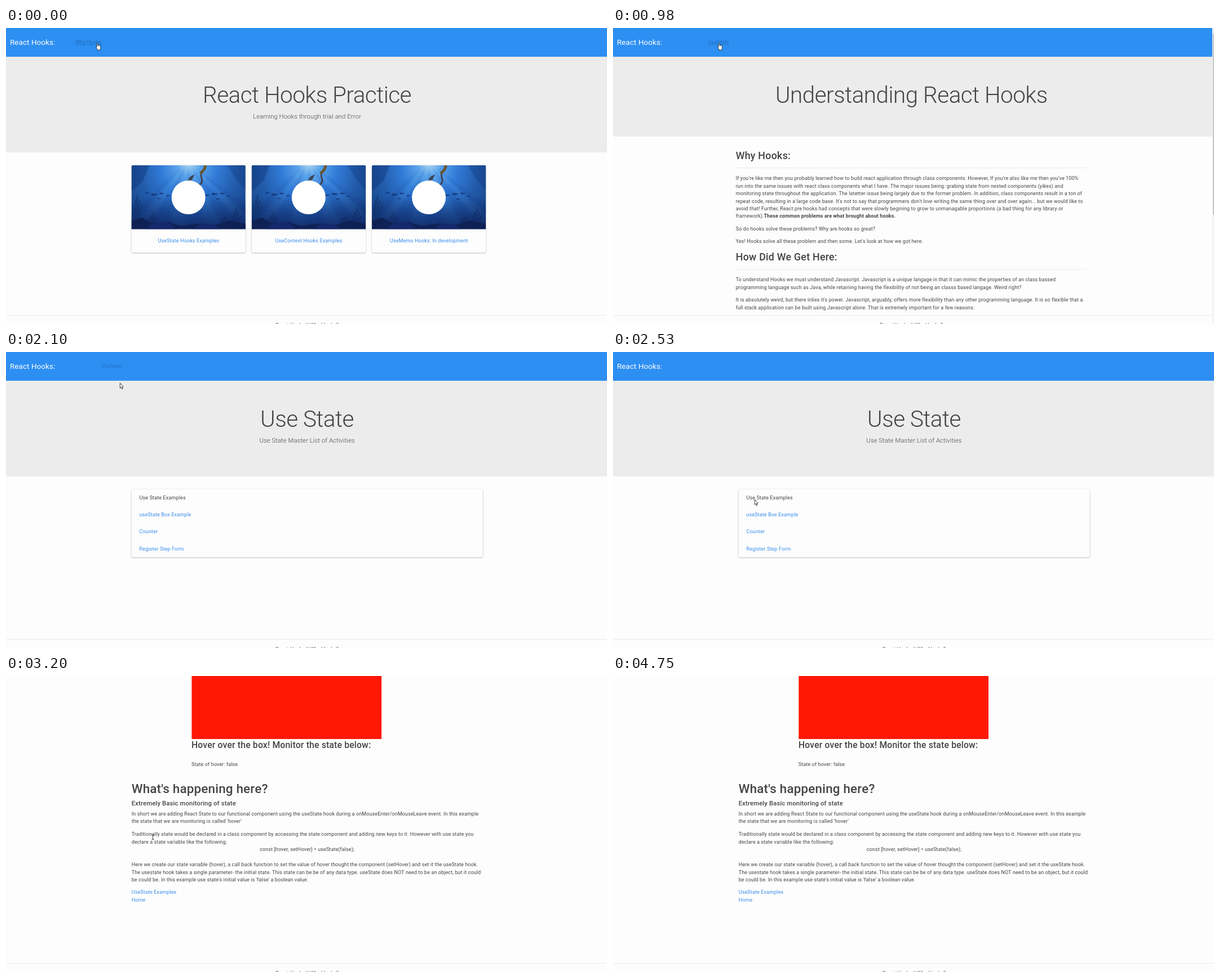
An HTML page with a canvas for the animation above (5560 ms loop, 1066 px wide and 526 px high).

```html
<!DOCTYPE html>
<html lang="en">
<head>
<meta charset="utf-8">
<title>React Hooks Practice</title>
<style>
  html, body { margin: 0; width: 100%; height: 100%; overflow: hidden; background: #fdfdfd; }
  canvas { display: block; }
</style>
</head>
<body>
<canvas id="stage" width="1066" height="526"></canvas>
<script>
const ctx = document.getElementById('stage').getContext('2d');
const W = 1066, H = 526, LOOP = 5560;
const REM = 8.98;
const INK = '#444', LINK = '#388cec', LINK_HOVER = '#1a66bd', BLUE = '#2d8ff2';

// Cursor and hover states: [start ms, cursor, x, y, hovered item, its colour]
const STEPS = [
  [0, 'hand', 159, 26, 'why', '#1f69bc'],
  [130, 'hand', 159, 26, 'why', '#2474c8'],
  [710, 'hand', 171, 26, 'state', '#2478cf'],
  [830, 'hand', 179, 26, 'state', '#206ebf'],
  [980, 'hand', 185, 26, 'state', '#206ebf'],
  [1380, 'hand', 185, 26, 'state', '#2272c6'],
  [2100, 'arrow', 202, 55, 'leaving', '#2272c6'],
  [2250, 'arrow', 217, 150],
  [2380, 'arrow', 228, 257],
  [2530, 'arrow', 251, 262],
  [2650, 'arrow', 258, 282],
  [2920, 'hand', 257, 285.5, 'box'],
  [3200, 'beam', 260.5, 286.5],
  [3480, 'beam', 270.5, 286.5],
  [3630, 'beam', 374, 221],
  [3780, 'arrow', 411, 169],
  [3930, 'arrow', 446, 98, 'red'],
  [4050, 'arrow', 466, 77, 'red'],
  [4360, 'arrow', 640, 260],
  [4490, 'arrow', 806, 442],
  [4630, 'arrow', 903, 508],
  [4750, 'none', 0, 0]
];

const PAGES = [[0, home], [130, article], [1230, stateList], [3200, boxExample]];

const at = (list, t) => list.findLast(item => item[0] <= t);

function rect(x, y, w, h, color) {
  ctx.fillStyle = color;
  ctx.fillRect(x, y, w, h);
}

// Draws a line of text around the vertical middle of its capitals; returns its width.
function text(str, x, mid, { size = REM, weight = 400, color = INK, align = 'left',
                             spacing = .12, style = '', underline = false } = {}) {
  ctx.font = `${style} ${weight} ${size}px Roboto, sans-serif`;
  ctx.letterSpacing = spacing + 'px';
  ctx.fillStyle = color;
  const width = ctx.measureText(str).width;
  const left = align === 'center' ? x - width / 2 : x;
  const base = mid + size * .355;
  ctx.fillText(str, left, base);
  if (underline) ctx.fillRect(left, base + .9, width, .7);
  return width;
}

const heading = (str, x, mid, rem) => text(str, x, mid, { size: REM * rem, weight: 500, spacing: .18 });
const link = (str, x, mid, opts) => text(str, x, mid, { color: LINK, spacing: .15, ...opts });

function paragraph(x, mid, ...lines) {
  lines.forEach((line, i) => {
    let left = x;
    for (const run of [line].flat()) {
      const [str, opts] = typeof run === 'string' ? [run] : [run.str, run];
      left += text(str, left, mid + i * 13.45, opts);
    }
  });
}

function chrome(center, pageWidth, step) {
  const [, , , , hover, color] = step;
  rect(0, 0, pageWidth, 51, BLUE);
  text('React Hooks:', 7, 25.3, { size: REM * 1.5, color: '#fff', spacing: .06 });
  if (hover === 'why') text('Why Hooks', 123, 25, { color, underline: true });
  if (hover === 'state' || hover === 'leaving')
    text('UseState', 169, 25, { color, underline: hover === 'state' });
  footer(center);
}

function footer(center) {
  rect(0, 510, W, 1, '#e9e9e9');
  text('React Hooks || Why Hooks?', center, 527.9, { align: 'center', color: '#666' });
}

function banner(center, width, bottom, title, lead) {
  ctx.fillStyle = '#ececec';
  ctx.beginPath();
  ctx.roundRect(0, 50, width, bottom - 50, [0, 0, 2, 2]);
  ctx.fill();
  rect(0, 51, width, 1, '#e0e3e7');
  text(title, center, 119, { size: REM * 4.5, weight: 300, align: 'center', spacing: -.5 });
  if (lead) text(lead, center, 156.8, { size: REM * 1.25, weight: 300, align: 'center' });
}

function card(x, y, w, h) {
  ctx.save();
  ctx.shadowColor = 'rgba(0,0,0,.32)';
  ctx.shadowBlur = 2.4;
  ctx.shadowOffsetY = .7;
  ctx.fillStyle = '#fdfdfd';
  ctx.beginPath();
  ctx.roundRect(x, y, w, h, 2);
  ctx.fill();
  ctx.restore();
}

function poly(color, points) {
  ctx.fillStyle = color;
  ctx.beginPath();
  points.forEach(p => ctx.lineTo(...p));
  ctx.fill();
}

function fish(x, y, size) {
  ctx.fillStyle = '#173f86';
  ctx.beginPath();
  ctx.ellipse(x, y, size, size * .5, 0, 0, 7);
  ctx.fill();
  poly('#173f86', [[x + size * .7, y], [x + size * 1.6, y - size * .5], [x + size * 1.6, y + size * .5]]);
}

function weed(x, base, height, color) {
  ctx.strokeStyle = color;
  ctx.lineWidth = 1.7;
  for (let i = -2; i <= 2; i++) {
    const top = base - height * (1 - Math.abs(i) * .2);
    ctx.beginPath();
    ctx.moveTo(x + i, base);
    ctx.bezierCurveTo(x + i * 5, base - 12, x + i * 1.5 - 4, top + 12, x + i * 4, top);
    ctx.stroke();
  }
}

function sea(x, y, w, h) {
  ctx.save();
  ctx.beginPath();
  ctx.roundRect(x, y, w, h, [2, 2, 0, 0]);
  ctx.clip();
  ctx.translate(x, y);
  const water = ctx.createRadialGradient(102, -6, 4, 102, 14, 128);
  [[0, '#a9d6f6'], [.14, '#5aa3ea'], [.38, '#317ad6'], [.68, '#215aa8'], [1, '#174286']]
    .forEach(stop => water.addColorStop(...stop));
  rect(0, 0, w, h, water);

  for (let i = 0; i < 9; i++) {
    const far = i * 34 - 35;
    poly(i % 2 ? 'rgba(120,190,250,.07)' : 'rgba(8,40,110,.07)', [[92 + i * 2, 0], [far, h], [far + 27, h]]);
  }
  poly('rgba(14,48,112,.4)', [[0, 0], [32, 0], [20, 28], [0, 46]]);
  poly('rgba(14,48,112,.3)', [[w, 0], [170, 0], [186, 26], [w, 44]]);

  const depth = ctx.createLinearGradient(0, 55, 0, h);
  depth.addColorStop(0, 'rgba(13,36,100,0)');
  depth.addColorStop(1, 'rgba(13,34,94,.8)');
  rect(0, 50, w, h - 50, depth);

  [[27, 49, 3], [39, 52, 4], [52, 50, 3], [64, 54, 2.6], [48, 59, 2.4], [133, 53, 3],
   [146, 51, 4], [160, 50, 3.2], [152, 60, 2.6], [171, 55, 2.4]].forEach(f => fish(...f));
  weed(11, 101, 48, '#12356f');
  weed(39, 106, 22, '#102a64');
  weed(187, 107, 30, '#122c68');
  weed(166, 108, 18, '#102a64');
  poly('#0f2154', [[0, 98], [19, 93], [37, 103], [63, 100], [88, 108], [121, 103],
                   [148, 106], [174, 98], [w, 104], [w, h], [0, h]]);
  poly('#15296a', [[37, 103], [63, 100], [80, h], [24, h]]);
  poly('#15296a', [[121, 103], [148, 106], [158, h], [110, h]]);

  ctx.lineCap = 'round';
  ctx.strokeStyle = '#3d4250';
  ctx.lineWidth = 2.8;
  ctx.stroke(new Path2D('M124 14 C121 21 128 25 124 31 C119 39 107 40 102 32 C100 26 104 21 109 19 L106 25'));
  ctx.strokeStyle = '#69552f';
  ctx.lineWidth = 5;
  ctx.stroke(new Path2D('M131 1 Q130 8 123.5 13'));

  ctx.fillStyle = '#fff';
  ctx.beginPath();
  ctx.arc(101, 57, 30, 0, 7);
  ctx.fill();
  ctx.restore();
}

function home(step) {
  banner(534, W, 221, 'React Hooks Practice', 'Learning Hooks through trial and Error');
  chrome(534, W, step);
  ['UseState Hooks Examples', 'UseContext Hooks Examples', 'UseMemo Hooks: In development']
    .forEach((label, i) => {
      const x = 222.6 + i * 213.2;
      card(x, 244, 202.2, 155.3);
      sea(x, 244, 202.2, 113.5);
      link(label, x + 101.2, 378.3, { align: 'center' });
    });
}

function article(step) {
  const x = 217.7;
  banner(529.3, 1063, 193, 'Understanding React Hooks');
  heading('Why Hooks:', x, 226.8, 2);
  rect(x, 248.3, 621.5, .8, '#e6e6e6');
  paragraph(x, 267,
    "If you're like me then you probably learned how to build react application through class components. However, If you're also like me then you've 100%",
    'run into the same issues with react class components what I have. The major issues being: grabing state from nested components (yikes) and',
    'monitoring state throughout the application. The latetter issue being largely due to the former problem. In addition, class components result in a ton of',
    ["repeat code, resulting in a large code base. It's not to say that programmers don't ", { str: 'love', style: 'italic' },
      ' writing the same thing over and over again... but we would like to'],
    'avoid that! Further, React pre hooks had concepts that were slowly begining to grow to unmanagable proportions (a bad thing for any library or',
    ['framework).', { str: 'These common problems are what brought about hooks.', weight: 700 }]);
  paragraph(x, 356.7, 'So do hooks solve these problems? Why are hooks so great?');
  paragraph(x, 379.2, "Yes! Hooks solve all these problem and then some. Let's look at how we got here.");
  heading('How Did We Get Here:', x, 407, 2);
  rect(x, 428.6, 621.5, .8, '#e6e6e6');
  paragraph(x, 447.2,
    'To understand Hooks we must understand Javascript. Javascript is a unique langage in that it can mimic the properties of an class bassed',
    'programming language such as Java, while retaining having the flexibility of not being an classs based langage. Weird right?');
  paragraph(x, 483.2,
    "It is absolutely weird, but there inlies it's power. Javascript, arguably, offers more flexibility than any other programming language. It is so flexible that a",
    'full stack application can be built using Javascript alone. That is extremely important for a few reasons:');
  chrome(529.3, 1063, step);
  rect(1063, 0, 3, H, '#f3f3f3');
  rect(1064.3, 10, 1.7, 322, '#bdbdbd');
}

function stateList(step) {
  const hovered = step[4] === 'box';
  banner(534, W, 221, 'Use State', 'Use State Master List of Activities');
  chrome(534, W, step);
  card(222.6, 244, 623, 120.7);
  text('Use State Examples', 236.6, 258.6, { spacing: .15 });
  link('useState Box Example', 236.6, 289,
    { underline: hovered, color: hovered ? LINK_HOVER : LINK });
  link('Counter', 236.6, 319.3);
  link('Register Step Form', 236.6, 349.6);
}

function boxExample(step) {
  const x = 222.7;
  rect(329.4, 0, 336.6, 112, '#ff1805');
  heading('Hover over the box! Monitor the state below:', 329, 122.2, 1.75);
  paragraph(329, 157, 'State of hover: ' + (step[4] === 'red'));
  heading("What's happening here?", x, 200.2, 2.5);
  heading('Extremely Basic monitoring of state', x, 226, 1.25);
  paragraph(x, 244.6,
    'In short we are adding React State to our functional component using the useState hook during a onMouseEnter/onMouseLeave event. In this example',
    "the state that we are monitoring is called 'hover'");
  paragraph(x, 281.2,
    'Traditionally state would be declared in a class component by accessing the state component and adding new keys to it. However with use state you',
    'declare a state variable like the following:');
  text('const [hover, setHover] = useState(false);', 534, 308.2, { align: 'center' });
  paragraph(x, 335,
    'Here we create our state variable (hover), a call back function to set the value of hover thought the component (setHover) and set it the useState hook.',
    'The usestate hook takes a single parameter- the initial state. This state can be be of any data type. useState does NOT need to be an object, but it could',
    "be could be. In this example use state's initial value is 'false' a boolean value.");
  link('UseState Examples', x, 384.3);
  link('Home', x, 397.8);
  footer(534);
}

const CURSORS = {
  hand: new Path2D('M2.2 1.3 Q3.1 -.2 4 1.3 V5 Q5 4.2 5.9 5.2 Q6.9 4.6 7.4 5.7 Q8.7 5.5 8.7 7 V9.5 Q8.6 11 7.8 12 V13.3 H3.3 V12.2 L.7 8.6 Q0 7.2 1 7 L2.2 8 Z'),
  arrow: new Path2D('M.3 .2 V9.4 L2.3 7.5 L3.7 10.8 L5 10.2 L3.7 7.1 L6.3 6.9 Z'),
  beam: new Path2D('M-2.2 -4.5 Q0 -4.5 0 -3.3 Q0 -4.5 2.2 -4.5 M0 -3.5 V3.5 M-2.2 4.5 Q0 4.5 0 3.3 Q0 4.5 2.2 4.5')
};

function drawCursor([, kind, x, y]) {
  const shape = CURSORS[kind];
  if (!shape) return;
  ctx.save();
  ctx.translate(x, y);
  ctx.lineWidth = .8;
  ctx.lineJoin = 'round';
  ctx.strokeStyle = '#111';
  ctx.fillStyle = '#fff';
  if (kind !== 'beam') ctx.fill(shape);
  ctx.stroke(shape);
  ctx.restore();
}

function render(now) {
  const t = now % LOOP;
  const step = at(STEPS, t);
  rect(0, 0, W, H, '#fdfdfd');
  at(PAGES, t)[1](step);
  drawCursor(step);
  requestAnimationFrame(() => render(performance.now() - start));
}

const start = performance.now();
render(0);
</script>
</body>
</html>
```
